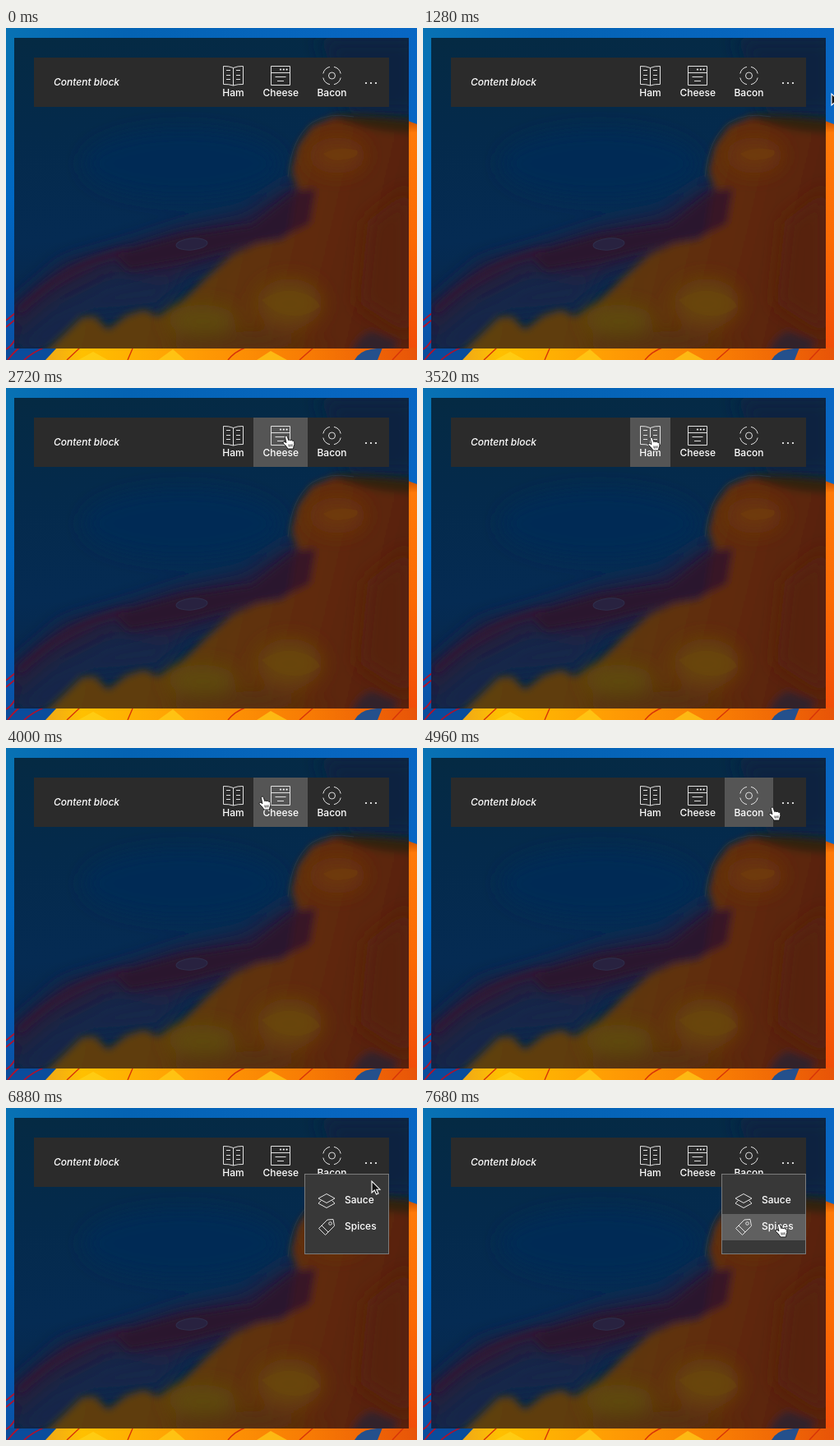
An HTML page that plays this animation: 500 by 404 pixels, repeating every 8 s.

```html
<!DOCTYPE html>
<html lang="en">
<head>
<meta charset="utf-8">
<title>Content block toolbar</title>
<style>
  html, body { margin: 0; width: 100%; height: 100%; overflow: hidden; background: #0064b8; }
  svg { display: block; width: 100%; height: 100%; }
  text { font: 500 12px Inter, "Liberation Sans", sans-serif; fill: #fff; }
  .mid { text-anchor: middle; }
  .icon { fill: none; stroke: #e2e2e2; stroke-width: 1; }
  .dots { fill: #fff; stroke: none; }
</style>
</head>
<body>
<svg viewBox="0 0 500 404" preserveAspectRatio="none">
  <defs>
    <linearGradient id="sky" x1="0" y1="0" x2="1" y2="0">
      <stop offset="0" stop-color="#0872b4"/>
      <stop offset=".3" stop-color="#0463b4"/>
      <stop offset="1" stop-color="#0867c4"/>
    </linearGradient>
    <linearGradient id="leftEdge" x1="0" y1="0" x2="0" y2="1">
      <stop offset="0" stop-color="#0873b2"/>
      <stop offset=".5" stop-color="#0068c4"/>
      <stop offset="1" stop-color="#0a50a4"/>
    </linearGradient>
    <linearGradient id="rightEdge" x1="0" y1="0" x2="0" y2="1">
      <stop offset="0" stop-color="#c85200"/>
      <stop offset=".05" stop-color="#ff7a08"/>
      <stop offset=".5" stop-color="#fb6a04"/>
      <stop offset="1" stop-color="#f04a08"/>
    </linearGradient>
    <linearGradient id="ground" x1="0" y1="0" x2="1" y2="0">
      <stop offset="0" stop-color="#f0a818"/>
      <stop offset=".1" stop-color="#ffc000"/>
      <stop offset=".4" stop-color="#ff9c04"/>
      <stop offset=".7" stop-color="#f87c04"/>
      <stop offset="1" stop-color="#e85408"/>
    </linearGradient>
    <linearGradient id="dusk" x1="0" y1="0" x2=".15" y2="1">
      <stop offset="0" stop-color="#052a43"/>
      <stop offset=".3" stop-color="#042a4b"/>
      <stop offset=".65" stop-color="#052b53"/>
      <stop offset="1" stop-color="#0a2547"/>
    </linearGradient>
    <linearGradient id="rock" x1="0" y1="0" x2="1" y2=".15">
      <stop offset="0" stop-color="#5d430d"/>
      <stop offset=".5" stop-color="#5f3a0c"/>
      <stop offset=".78" stop-color="#602a0b"/>
      <stop offset="1" stop-color="#58220a"/>
    </linearGradient>
    <filter id="soft" x="-30%" y="-30%" width="160%" height="160%"><feGaussianBlur stdDeviation="5"/></filter>
    <filter id="haze" x="-60%" y="-60%" width="220%" height="220%"><feGaussianBlur stdDeviation="11"/></filter>
    <clipPath id="pane"><rect x="10" y="12" width="480" height="378"/></clipPath>
  </defs>

  <!-- wallpaper around the pane -->
  <rect width="500" height="404" fill="url(#sky)"/>
  <rect y="12" width="10" height="392" fill="url(#leftEdge)"/>
  <rect y="389" width="70" height="15" fill="#0a4c9c"/>
  <path d="M489 113L500 117V404H489Z" fill="url(#rightEdge)"/>
  <path d="M48 404L62 389H500V404Z" fill="url(#ground)"/>
  <path d="M424 404Q430 393 444 391L458 389 452 404Z" fill="#24508c"/>
  <g fill="none" stroke="#b0122c" stroke-width="1.8">
    <path d="M0 356L11 347M0 364L11 355M0 391Q6 388 11 379M2 404Q8 396 16 389M22 404Q32 395 46 389"/>
    <path d="M74 404L90 389M148 404L154 390M270 404Q278 394 291 389M357 404L374 389M470 404L484 389" stroke="#d83408" stroke-width="1.4"/>
  </g>
  <path d="M88 404L106 394 124 404M185 404L203 391 218 404M305 404L322 393 342 404" fill="#ffd41c" opacity=".65"/>

  <!-- blurred, darkened pane -->
  <g clip-path="url(#pane)">
    <rect x="10" y="12" width="480" height="378" fill="url(#dusk)"/>
    <g filter="url(#haze)">
      <path d="M380 12H500V105H420Z" fill="#07243f"/>
      <ellipse cx="215" cy="165" rx="120" ry="42" fill="#052c54"/>
      <path d="M0 345L70 285 150 262 210 242 290 226 345 190 385 185 385 250 270 285 200 305 130 300 60 335 0 385Z" fill="#251b3a"/>
      <path d="M0 395L60 345 130 310 215 303 190 340 100 350 50 395Z" fill="#16254a"/>
    </g>
    <g filter="url(#soft)">
      <path d="M130 275L215 252 300 240 350 200 380 195 375 245 300 262 215 284 150 295Z" fill="#2c182f"/>
      <path d="M15 345Q75 285 148 272" fill="none" stroke="#351733" stroke-width="7"/>
      <path d="M40 402L65 378 92 352 108 351 124 367 146 350 168 343 185 351 213 335 240 307 276 275 305 262 335 257 366 235 372 213 354 194 347 173 355 143 372 119 396 109 425 111 460 119 500 119V402Z" fill="url(#rock)"/>
      <path d="M395 107Q430 103 500 112V128Q440 128 395 107Z" fill="#33200f"/>
      <path d="M352 198L377 195 370 238 344 251Z" fill="#371526"/>
      <path d="M418 402Q425 374 445 369L478 380 466 402Z" fill="#302329"/>
    </g>
    <g filter="url(#haze)">
      <ellipse cx="403" cy="155" rx="34" ry="22" fill="#6a360b"/>
      <path d="M440 235L492 195V375L430 335Z" fill="#56200a"/>
      <ellipse cx="345" cy="335" rx="40" ry="30" fill="#66420a"/>
      <ellipse cx="238" cy="355" rx="42" ry="18" fill="#5e480d"/>
      <path d="M210 375L310 368 395 390 200 394Z" fill="#54310d"/>
    </g>
    <path d="M343 181Q347 134 372 115Q393 102 423 108" fill="none" stroke="#31414d" stroke-width="1" opacity=".55"/>
    <ellipse cx="226" cy="263" rx="19" ry="7" transform="rotate(-5 226 263)" fill="#282545" stroke="#303552" opacity=".8"/>
    <path d="M386 153Q404 143 427 149Q431 158 410 160Q397 164 386 153Z" fill="#713c0b" opacity=".65"/>
    <path d="M311 331Q333 317 350 320Q377 325 382 339Q363 354 342 349Q326 347 311 331Z" fill="#6c490b" opacity=".4"/>
  </g>

  <!-- toolbar -->
  <rect x="34" y="36" width="432" height="60" fill="#2b2b2b"/>
  <rect id="cell" y="36" height="60" fill="#555"/>
  <text x="58" y="70" font-style="italic" style="font-style:italic">Content block</text>
  <g class="icon">
    <path d="M276.5 48.5Q271 46.2 264.5 46.5V68.5Q271 68.2 276.5 70Q282 68.2 288.5 68.5V46.5Q282 46.2 276.5 48.5V70"/>
    <path d="M268 51.5H273M268 57.5H273M268 62.5H273M280 51.5H285M280 57.5H285M280 62.5H285"/>
    <path d="M322.5 46.5H345.5V69.5H322.5ZM322.5 54.5H345.5M327.5 59.5H340.5M330 64.5H338"/>
    <circle cx="396.5" cy="58" r="4"/>
    <circle cx="396.5" cy="58" r="11" pathLength="80" stroke-dasharray="14 6" stroke-dashoffset="-3"/>
  </g>
  <g class="dots">
    <circle cx="334" cy="50.5" r="1.1"/><circle cx="337.8" cy="50.5" r="1.1"/><circle cx="341.6" cy="50.5" r="1.1"/>
    <circle cx="438" cy="67" r="1.1"/><circle cx="444" cy="67" r="1.1"/><circle cx="450" cy="67" r="1.1"/>
  </g>
  <text class="mid" x="276.5" y="83">Ham</text>
  <text class="mid" x="334.2" y="83">Cheese</text>
  <text class="mid" x="396.5" y="83">Bacon</text>

  <!-- overflow menu -->
  <g id="menu">
    <rect x="363.5" y="80.5" width="102" height="97" fill="#383838" stroke="#7c7c7c"/>
    <rect id="row" x="364" width="101" height="32" fill="#606060"/>
    <g class="icon">
      <path d="M390 104.5L400 110 390 115.5 380 110ZM383.5 112.5L380 116 390 121.5 400 116 396.5 112.5"/>
      <path d="M380.5 146.5L391 136 398 135.5 399.5 143.5 388.5 154.5ZM384 143L392 151"/>
      <circle cx="394.5" cy="140.5" r="1.8"/>
    </g>
    <text x="412" y="116">Sauce</text>
    <text x="412" y="148">Spices</text>
  </g>

  <!-- pointers, hot spot at 0,0 -->
  <path id="arrow" d="M0 0V14L3.3 11 5.5 16 8 15 5.8 10.2H10Z" fill="#111" stroke="#fff" stroke-width="1.1"/>
  <g id="hand" stroke="#111" stroke-width=".9" stroke-linejoin="round">
    <path d="M-1.6 1.3Q-1.2-.4 .3.1Q1.2.5 1.5 1.8L2.7 5.6Q4 4.3 5 5.6Q6.6 4.7 7.4 6.2Q9.2 5.7 9.7 7.6Q10.4 11 8.9 13.2L8.6 16H1.8Q.8 13.8-.9 12L-3.7 9.3Q-4.7 7.7-3.2 7.2Q-1.8 7-.1 8.8Z" fill="#fff"/>
    <path d="M2.9 10.5L3.3 13.5M5 10.5V13.5M7 10.3L6.9 13.3" fill="none" stroke-width=".8"/>
  </g>
</svg>

<script>
const LOOP = 8000, STEP = 160;
const $ = id => document.getElementById(id);
const [cell, row, menu, arrow, hand] = ["cell", "row", "menu", "arrow", "hand"].map($);

// Pointer moves: start, end, then x and y at both ends.
const moves = [
  [1280, 2240, 497, 80, 398, 65],
  [2720, 2880, 341, 58, 336, 59],
  [3360, 3520, 294, 59, 278, 60],
  [4000, 4320, 312, 59, 338, 62],
  [4640, 4960, 368, 66, 425, 72],
  [5600, 5760, 436, 69, 442, 67],
  [6880, 7680, 445, 89, 433, 141]
];
const cells = [[252, 301], [301, 367], [367, 426]];
const rows = [[97, 129], [129, 161]];
const mix = (a, b, k) => a + (b - a) * k;
const within = (list, v) => list.find(([a, b]) => v >= a && v < b);
const show = (el, on) => el.setAttribute("visibility", on ? "visible" : "hidden");

function pointerAt(t) {
  const move = moves.filter(m => t >= m[0]).pop();
  if (!move) return null;
  const [start, end, x0, y0, x1, y1] = move;
  const p = Math.min(1, (t - start) / (end - start));
  const k = 1 - (1 - p) ** 1.4;
  return { x: mix(x0, x1, k), y: mix(y0, y1, k) };
}

function draw(time) {
  const t = Math.floor(time % LOOP / STEP) * STEP;
  const p = pointerAt(t);
  const open = t >= 6240;
  const inMenu = open && p.y > 80;
  const hotCell = p && !open && within(cells, p.x);
  const hotRow = inMenu && within(rows, p.y);
  const overMore = p && !inMenu && p.x >= 426 && p.x < 466;

  show(cell, hotCell);
  if (hotCell) {
    cell.setAttribute("x", hotCell[0]);
    cell.setAttribute("width", hotCell[1] - hotCell[0]);
  }
  show(menu, open);
  menu.setAttribute("opacity", t < 6400 ? 0.6 : 1);
  show(row, hotRow);
  if (hotRow) row.setAttribute("y", hotRow[0]);

  const pressable = hotCell || hotRow || overMore;
  show(hand, p && pressable);
  show(arrow, p && !pressable);
  if (p) for (const el of [hand, arrow])
    el.setAttribute("transform", `translate(${Math.round(p.x)} ${Math.round(p.y)})`);
}

let origin;
function tick(now) {
  origin ??= now;
  draw(now - origin);
  requestAnimationFrame(tick);
}
draw(0);
requestAnimationFrame(tick);
</script>
</body>
</html>
```
